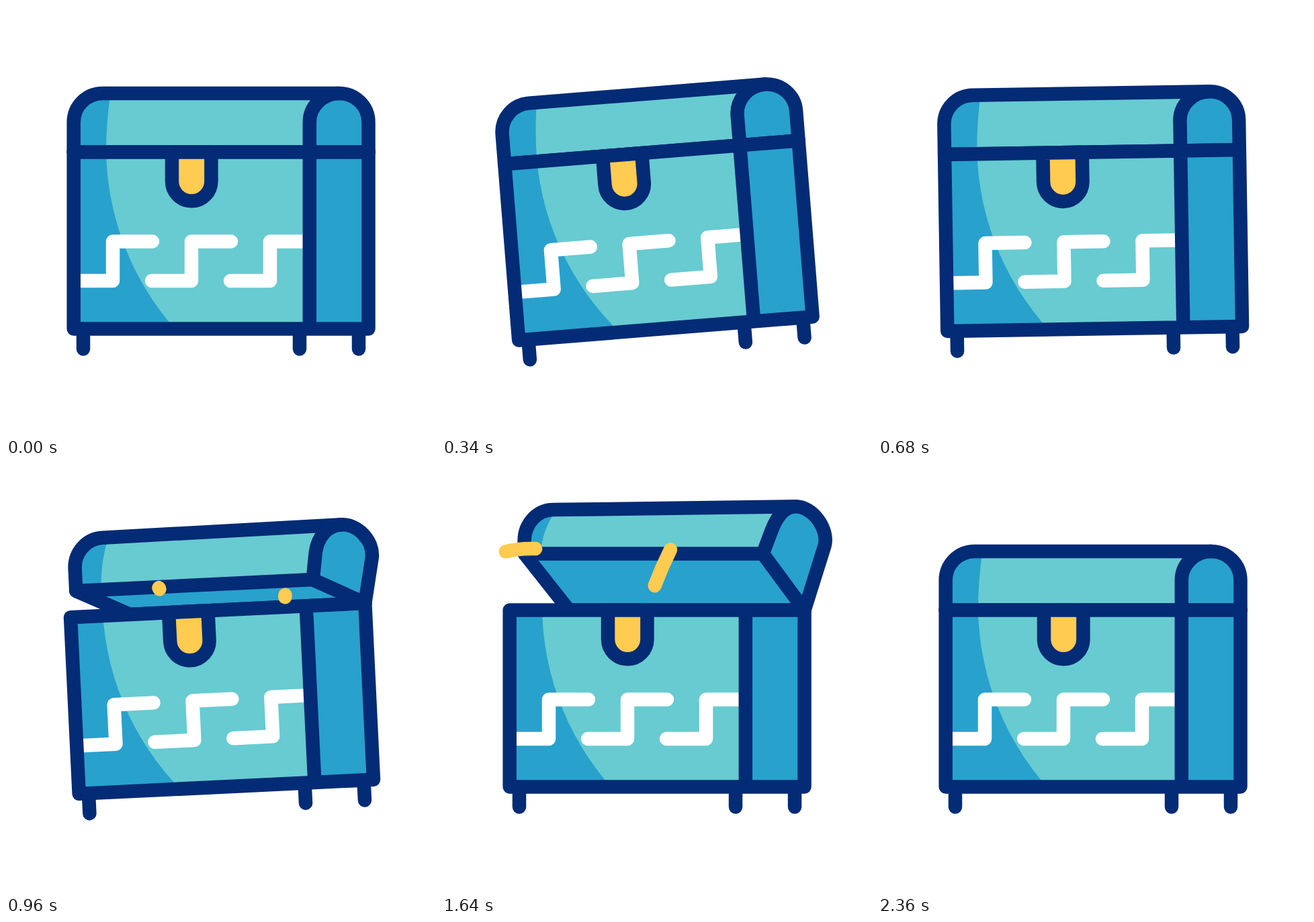
Animation of 640 by 640 pixels, one loop 2.4 s. Source, as an HTML page:

```html
<!DOCTYPE html>
<html lang="en">
<head>
<meta charset="utf-8">
<title>Treasure chest</title>
<style>
  html, body { margin: 0; width: 100%; height: 100%; overflow: hidden; background: #fff; }
  svg { display: block; width: 100vw; height: 100vh; }
  .line { fill: none; stroke: #042b75; stroke-width: 20.5; stroke-linejoin: round; }
  .cap { stroke-linecap: round; }
  .blue { fill: #28a1cd; }
  .teal { fill: #67cbd1; }
  .gold { fill: #ffcb50; }
  .white { fill: none; stroke: #fff; stroke-width: 20.5; stroke-linecap: round; stroke-linejoin: round; }
  .coin { fill: none; stroke: #ffcb50; stroke-width: 20.5; stroke-linecap: round; }
</style>
</head>
<body>
<svg viewBox="0 0 640 640">
  <defs>
    <clipPath id="front"><path d="M101 217.5H452V480.5H101Z"/></clipPath>
    <clipPath id="lidClip"><path id="lidShape"/></clipPath>
  </defs>
  <g id="chest">
    <path id="inside" class="line" style="fill:#28a1cd"/>
    <path id="lidFront" class="teal"/>
    <path id="lidShade" class="blue" clip-path="url(#lidClip)"/>
    <path id="lidSide" class="blue"/>
    <path id="lidEdge" class="line cap"/>
    <path id="lidRim" class="line cap"/>

    <path class="line cap" d="M115 481V510.5M437 481V510.5M525 481V510.5"/>
    <path class="blue" d="M101 217.5H539.5V480.5H101Z"/>
    <g clip-path="url(#front)">
      <circle class="teal" cx="558" cy="210" r="409"/>
      <path class="white" d="M100 409H159V350.5H218M217 409H276V350.5H335M334 409H393V350.5H452"/>
    </g>
    <path class="line" d="M100.7 217.5H539.5V480.5H100.7ZM451.8 217.5V480.5"/>
    <path class="line gold" style="fill:#ffcb50" d="M247 217.5V261a29.2 29.2 0 0 0 58.4 0V217.5Z"/>
    <g id="coins"></g>
  </g>
</svg>
<script>
const LOOP = 2400;
const $ = id => document.getElementById(id);
const clamp = x => Math.max(0, Math.min(1, x));
const smooth = x => (x = clamp(x), x * x * (3 - 2 * x));
const mix = (a, b, k) => a + (b - a) * k;

// Lid points: closed x, y, open x, y
const LID = {
  FL: [100.7, 217.5, 123, 132],
  L: [100.7, 173, 123, 113],
  L1: [100.7, 149, 123, 88],
  L2: [120, 130, 142, 67],
  TL: [144, 130, 166, 67],
  TR: [496, 130, 527, 62],
  R1: [520, 130, 553, 62],
  R2: [539.5, 149, 577, 97],
  R: [539.5, 173, 570, 121],
  B: [539.5, 217.5, 539.5, 217.5],
  BL: [189, 217.5, 189, 217.5],
  A: [451.8, 217.5, 478, 132],
  D: [451.8, 173, 491, 98],
  D1: [451.8, 149, 501, 73],
  D2: [472, 130, 512, 62],
  S0: [149, 217.5, 147, 132],
  S1: [149, 175, 149, 95],
  S2: [155.5, 130, 171, 67]
};

const SWING = [0, -6.7, 5.7, -6.7, 0];
const SWING_STEP = 270;

function tilt(t) {
  const i = Math.floor(t / SWING_STEP);
  return i > 3 ? 0 : mix(SWING[i], SWING[i + 1], smooth(t / SWING_STEP - i));
}

function opening(t) {
  return t < 1635 ? smooth((t - 753) / 444) : Math.pow(clamp((2370 - t) / 735), 2.17);
}

function drawLid(s) {
  const path = spec => spec.replace(/[A-Z]+\d?/g, k => {
    const p = LID[k];
    return p ? mix(p[0], p[2], s).toFixed(2) + "," + mix(p[1], p[3], s).toFixed(2) : k;
  });
  // lower-case commands keep clear of point names
  const set = (id, spec) => $(id).setAttribute("d",
    path(spec).replace(/[mlcqz]/g, c => c.toUpperCase()));
  const front = "m FL l L c L1 L2 TL l TR c D2 D1 D l A z";
  set("inside", "m FL l BL l B l A");
  set("lidFront", front);
  set("lidShape", front);
  set("lidShade", "m S0 q S1 S2 l TL c L2 L1 L l FL z");
  set("lidSide", "m A l D c D1 D2 TR c R1 R2 R l B z");
  set("lidEdge", "m FL l L c L1 L2 TL l TR c R1 R2 R l B");
  set("lidRim", "m FL l A l B m A l D c D1 D2 TR");
}

const FLIGHT = 440, LAG = 0.1;
const ROUTES = [
  { d: "M235 182C222 148 175 126 140 126C75 124 29 150 29 240", starts: [938, 1410] },
  { d: "M306 212C336 116 398 12 452 12C530 12 590 140 590 342", starts: [1065, 1537] },
  { d: "M421 203C430 120 480 60 520 60C570 60 590 150 590 300", starts: [938] }
];
const coins = ROUTES.flatMap(({ d, starts }) => starts.map(start => {
  const el = document.createElementNS("http://www.w3.org/2000/svg", "path");
  el.setAttribute("class", "coin");
  el.setAttribute("d", d);
  $("coins").append(el);
  return { el, start, size: el.getTotalLength() };
}));

function drawCoin({ el, start, size }, t) {
  const v = (t - start) / FLIGHT;
  const shown = v > 0 && v < 1 + LAG;
  el.style.display = shown ? "" : "none";
  if (!shown) return;
  const tail = smooth(v - LAG) * size;
  const len = Math.max(0.1, smooth(v) * size - tail);
  el.setAttribute("stroke-dasharray", len + " " + size * 3);
  el.setAttribute("stroke-dashoffset", -Math.min(tail, size - 0.2));
}

function draw(t) {
  $("chest").setAttribute("transform", `rotate(${tilt(t)} 320 320)`);
  drawLid(opening(t));
  coins.forEach(c => drawCoin(c, t));
}

const begin = performance.now();
function tick() {
  draw((performance.now() - begin) % LOOP);
  requestAnimationFrame(tick);
}
tick();
</script>
</body>
</html>
```
